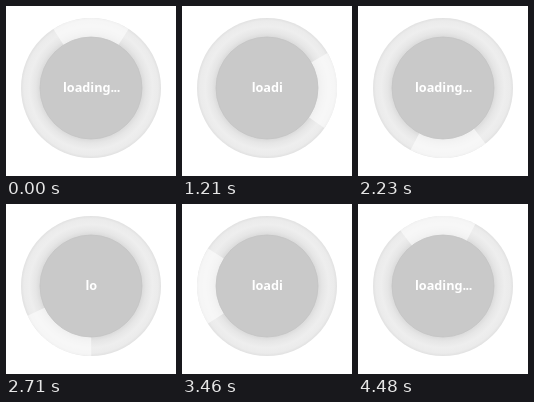
An HTML page for the animation above (4510 ms loop, 170x170 px).

```html
<!DOCTYPE html>
<html lang="en">
<head>
<meta charset="utf-8">
<title>Loading</title>
<style>
  html, body { margin: 0; width: 100%; height: 100%; overflow: hidden; background: #fff; }
  svg { display: block; width: 100vw; height: 100vh; }
  text { font: bold 12.7px "Noto Sans", sans-serif; fill: #fff; text-anchor: middle; }
  #dots { letter-spacing: -.6px; }
</style>
</head>
<body>
<svg viewBox="0 0 170 170">
  <defs>
    <radialGradient id="ring" gradientUnits="userSpaceOnUse" cx="85" cy="82" r="70">
      <stop offset=".73" stop-color="#dbdbdb"/>
      <stop offset=".79" stop-color="#e6e6e6"/>
      <stop offset=".88" stop-color="#eee"/>
      <stop offset=".96" stop-color="#ebebeb"/>
      <stop offset="1" stop-color="#e1e1e1"/>
    </radialGradient>
  </defs>
  <circle cx="85" cy="82" r="70" fill="url(#ring)"/>
  <path id="sector" fill="#fff" fill-opacity=".57"/>
  <circle cx="85" cy="82" r="51" fill="#c9c9c9" stroke="#c4c4c4" stroke-width=".8"/>
  <text x="85.3" y="86"><tspan id="word"></tspan><tspan id="dots"></tspan></text>
</svg>
<script>
  const LOOP = 4510, FIRST = 100, STEP = 30, STEPS = 148;
  const CX = 85, CY = 82, RADIUS = 70, HALF_WIDTH = 32.5;
  const WORD = "loading";
  // [step, degrees]; the turn is linear between these.
  const turn = [[0, 0], [74, 180], [113, 270], [149, 360]];
  const [sector, word, dots] = ["sector", "word", "dots"].map(id => document.getElementById(id));

  function angleAt(step) {
    const i = turn.findIndex(([s]) => s > step);
    const [s0, a0] = turn[i - 1], [s1, a1] = turn[i];
    return a0 + (a1 - a0) * (step - s0) / (s1 - s0);
  }

  // Degrees run clockwise from the top.
  function rim(degrees) {
    const a = degrees * Math.PI / 180;
    return `${CX + RADIUS * Math.sin(a)} ${CY - RADIUS * Math.cos(a)}`;
  }

  function draw(now) {
    const t = now % LOOP;
    const step = t < FIRST ? 0 : 1 + Math.floor((t - FIRST) / STEP);
    const angle = angleAt(step);
    sector.setAttribute("d", `M${CX} ${CY}L${rim(angle - HALF_WIDTH)}` +
      `A${RADIUS} ${RADIUS} 0 0 1 ${rim(angle + HALF_WIDTH)}Z`);

    // The word is typed twice per turn; the dots arrive together as the eighth key.
    const half = STEPS / 2;
    const keys = 1 + Math.floor((step + half - 1) % half / half * 8);
    word.textContent = WORD.slice(0, keys);
    dots.textContent = keys > WORD.length ? "..." : "";
    requestAnimationFrame(animate);
  }

  const start = performance.now();
  function animate() { draw(performance.now() - start); }
  animate();
</script>
</body>
</html>
```
